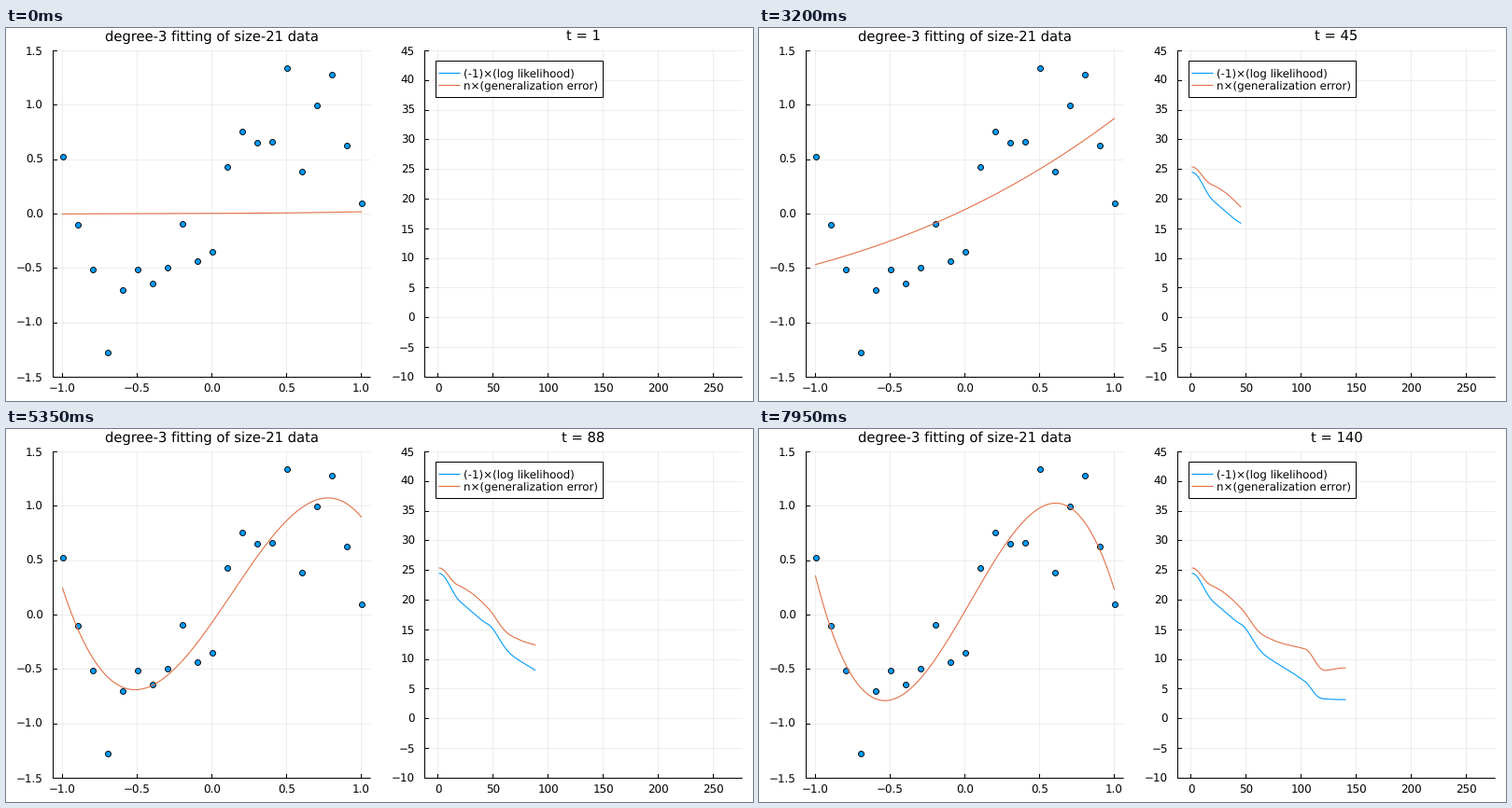
These frames come from a looping animation (800 px wide and 400 px high, 8 s). A matplotlib script:

```python
import numpy as np
import matplotlib.pyplot as plt
from matplotlib.animation import FuncAnimation
from matplotlib.patches import Rectangle

plt.rcParams["font.family"] = "DejaVu Sans"
plt.rcParams["text.hinting"] = "none"

PX = 0.72  # points per pixel at 100 dpi
BLUE, ORANGE = "#009afa", "#e26f46"
TOP, BOTTOM = 24.4, 374.4
HOLD, FRAMES, INTERVAL = 19, 160, 50

fig = plt.figure(figsize=(8, 4), dpi=100, facecolor="white")
stage = fig.add_axes([0, 0, 1, 1])
stage.set(xlim=(0, 800), ylim=(400, 0))
stage.axis("off")


def line(xs, ys, color="black", width=1.0, **kw):
    return stage.plot(xs, ys, color=color, lw=width * PX, snap=False, **kw)[0]


def crisp(value):
    """Centre of the pixel that holds a coordinate."""
    return np.floor(value) + 0.5


def label(x, y, text, size=11.85, align="center"):
    return stage.text(x, y, text, fontsize=size * PX, ha=align, va="baseline", zorder=6)


class Panel:
    def __init__(self, left, right, xlim, ylim):
        self.left, self.right, self.xlim, self.ylim = left, right, xlim, ylim

    def x(self, value):
        lo, hi = self.xlim
        return self.left + (np.asarray(value) - lo) / (hi - lo) * (self.right - self.left)

    def y(self, value):
        lo, hi = self.ylim
        return BOTTOM - (np.asarray(value) - lo) / (hi - lo) * (BOTTOM - TOP)

    def draw(self, xticks, yticks, fmt):
        def text(value):
            return format(value, fmt).replace("-", "\u2212")

        left, bottom = crisp(self.left), crisp(BOTTOM)
        for v in xticks:
            x = crisp(self.x(v))
            line([x, x], [TOP, bottom], alpha=0.065, zorder=1)
            line([x, x], [bottom, bottom - 4], zorder=2)
            label(self.x(v), 391.3, text(v))
        for v in yticks:
            y = crisp(self.y(v))
            line([left, self.right], [y, y], alpha=0.065, zorder=1)
            line([left, left + 4], [y, y], zorder=2)
            label(left - 10.5, self.y(v) + 4.1, text(v), align="right")
        line([left, left], [TOP, bottom], zorder=2)
        line([left, self.right], [bottom, bottom], zorder=2)

    def title(self, text):
        return label((self.left + self.right) / 2, 13.4, text, 14.8)


def smooth(t, times, values):
    """Monotone cubic path through key poses, at rest at both ends."""
    gaps, slopes = np.diff(times), np.diff(values) / np.diff(times)
    before, after = slopes[:-1], slopes[1:]
    same_way = before * after > 0
    tangents = np.zeros(len(times))
    tangents[1:-1][same_way] = (2 * before * after)[same_way] / (before + after)[same_way]
    k = np.clip(np.searchsorted(times, t, side="right") - 1, 0, len(gaps) - 1)
    h = gaps[k]
    u = (t - times[k]) / h
    ease = u * u * (3 - 2 * u)
    return (values[k] + ease * (values[k + 1] - values[k])
            + h * u * (1 - u) * ((1 - u) * tangents[k] - u * tangents[k + 1]))


fit = Panel(50.9, 390.1, (-1.06, 1.06), (-1.5, 1.5))
fit.draw(np.arange(-1, 1.1, 0.5), np.arange(-1.5, 1.6, 0.5), ".1f")
fit.title("degree-3 fitting of size-21 data")

loss = Panel(448.7, 788.2, (-12, 276), (-10, 45))
loss.draw(range(0, 251, 50), range(-10, 46, 5), "d")
counter = loss.title("t = 1")

# Noisy observations of sin(pi x).
data_x = np.linspace(-1, 1, 21)
data_y = np.array([0.522, -0.096, -0.511, -1.272, -0.702, -0.513, -0.642,
                   -0.494, -0.088, -0.432, -0.347, 0.428, 0.758, 0.659,
                   0.667, 1.344, 0.385, 1.0, 1.278, 0.630, 0.099])
NOISE = 0.3
line(fit.x(data_x), fit.y(data_y), ls="none", marker="o",
     ms=6 * PX, mfc=BLUE, mec="black", mew=0.9 * PX, zorder=3)

# Step, cubic coefficients from constant to x^3, model deviation.
poses = np.array([
    (1, 0.005, 0.006, 0.005, 0.004, 1.0),
    (21, 0.090, 0.200, 0.080, 0.050, 0.64),
    (45, 0.040, 0.656, 0.166, 0.015, 0.49),
    (73, -0.093, 1.830, 0.683, -1.380, 0.45),
    (104, -0.025, 2.076, 0.550, -1.876, 0.36),
    (122, 0.053, 2.337, 0.217, -2.387, 0.30),
    (140, 0.0345, 2.374, 0.262, -2.435, 0.285),
])
steps = np.arange(1, FRAMES - HOLD)
*coeffs, sigma = [smooth(steps, poses[:, 0], column) for column in poses[:, 1:].T]


def predict(xs):
    """Fitted cubic at xs, one row per step."""
    return sum(np.outer(c, xs ** power) for power, c in enumerate(coeffs))


def negative_log_density(mean_square):
    return len(data_x) * (np.log(sigma * np.sqrt(2 * np.pi)) + mean_square / (2 * sigma ** 2))


curve_x = np.linspace(-1, 1, 201)
curves = predict(curve_x)
data_error = np.mean((predict(data_x) - data_y) ** 2, axis=1)
true_error = np.mean((curves - np.sin(np.pi * curve_x)) ** 2, axis=1) + NOISE ** 2
histories = [negative_log_density(e) for e in (data_error, true_error)]

traces = [line([], [], color, 1.1, zorder=3) for color in (BLUE, ORANGE)]
curve = line([], [], ORANGE, 1.1, zorder=4)

stage.add_patch(Rectangle((460.5, 35.5), 179, 39, fc="white", ec="black",
                          lw=PX, snap=False, zorder=5))
entries = [(48.5, BLUE, "(-1)\u00d7(log likelihood)"),
           (61.5, ORANGE, "n\u00d7(generalization error)")]
for y, color, text in entries:
    line([464, 486], [y, y], color, 1.1, zorder=6)
    label(489.5, y + 4, text, align="left")


def update(frame):
    t = max(1, frame - HOLD)
    curve.set_data(fit.x(curve_x), fit.y(curves[t - 1]))
    for trace, history in zip(traces, histories):
        trace.set_data(loss.x(steps[:t]), loss.y(history[:t]))
    counter.set_text(f"t = {t}")
    return [curve, counter, *traces]


anim = FuncAnimation(fig, update, frames=FRAMES, interval=INTERVAL,
                     repeat=True, repeat_delay=0)
plt.show()
```
